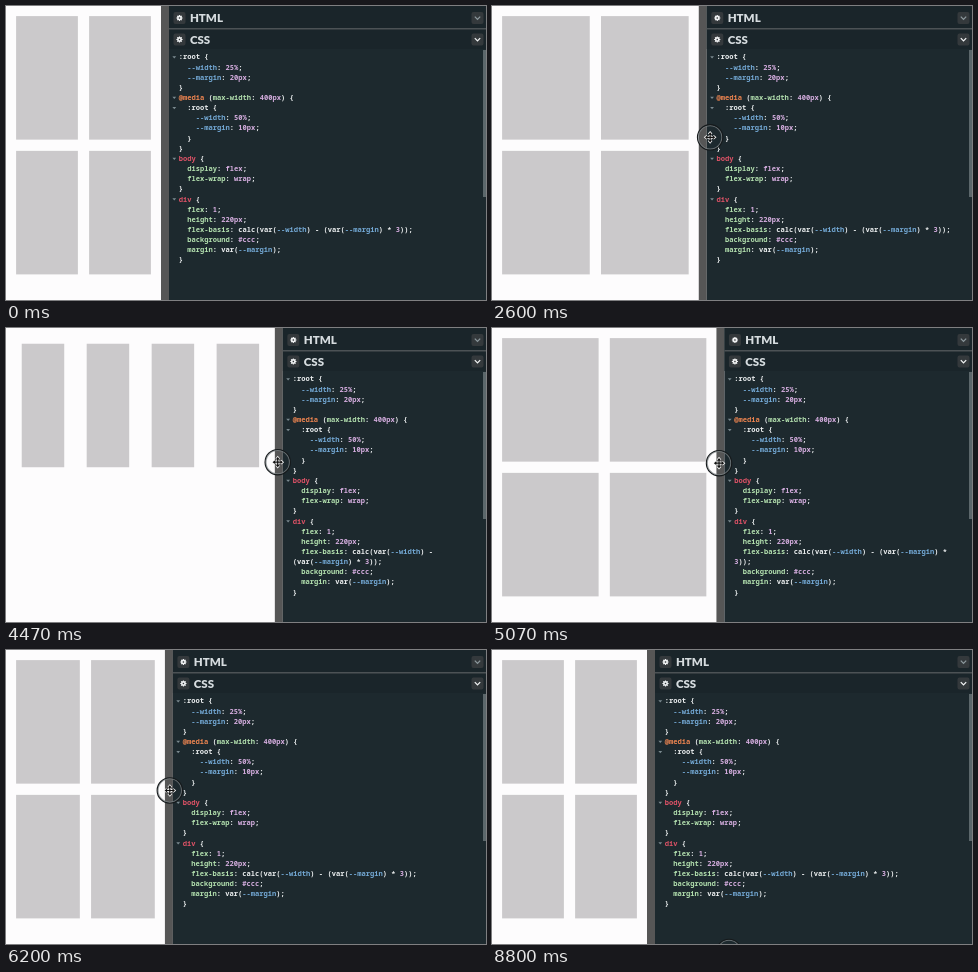
Recreate the animation shown at these times as an HTML page with a canvas. Size 480 px wide and 294 px high, loop 8870 ms.

```html
<!DOCTYPE html>
<html lang="en">
<head>
<meta charset="utf-8">
<title>Responsive flex columns</title>
<style>
html, body { margin: 0; width: 100%; height: 100%; overflow: hidden; background: #fdfcfd; }
canvas { display: block; }
</style>
</head>
<body>
<canvas id="stage" width="480" height="294"></canvas>
<script>
const ctx = document.getElementById('stage').getContext('2d');
const LOOP = 8870, SCALE = 0.5615, CHAR = 4.255, LINE = 10.15;

const code = `:root {
  --width: 25%;
  --margin: 20px;
}
@media (max-width: 400px) {
  :root {
    --width: 50%;
    --margin: 10px;
  }
}
body {
  display: flex;
  flex-wrap: wrap;
}
div {
  flex: 1;
  height: 220px;
  flex-basis: calc(var(--width) - (var(--margin) * 3));
  background: #ccc;
  margin: var(--margin);
}`.split('\n');

// One colour per group: plain text, at-rule, tag, variable, property, value
const token = /(:root|calc|var)|(@media)|(body|div)|(--\w+)|([\w-]+(?=:))|(#?\w[\w%]*)|(\s+|.)/g;
const colors = ['#eceff0', '#ec8450', '#dc5266', '#73a8d4', '#b2dfae', '#d6aee0', '#eceff0'];

function ease(t, start, duration, power = 1) {
  const u = Math.min(1, Math.max(0, (t - start) / duration)) ** power;
  return u * u * (3 - 2 * u);
}

const dragOut = t => ease(t, 1600, 2000, 1.37);
const dragBack = t => ease(t, 3440, 3050);
const previewWidth = t => 155 + 155 * (dragOut(t) - dragBack(t));

// The divider trails the pointer slightly while dragged
function pointerAt(t) {
  const away = 1 - ease(t, 70, 1530), leave = ease(t, 6950, 1120);
  return {
    x: previewWidth(t + 45) + 6 + 76 * (away + leave),
    y: 130 + 4 * dragOut(t) + 7 * dragBack(t) ** 3 + 180 * away + 161 * leave,
    onHandle: away + leave < 0.01
  };
}

function rect(x, y, w, h, color) {
  ctx.fillStyle = color;
  ctx.fillRect(x, y, w, h);
}

function stroke(color, width, path) {
  ctx.strokeStyle = color;
  ctx.lineWidth = width;
  path ? ctx.stroke(path) : ctx.stroke();
}

function ring(x, y, radius, color, width) {
  ctx.beginPath();
  ctx.arc(x, y, radius, 0, 7);
  stroke(color, width);
}

function drawPreview(w) {
  const cols = w <= 225.4 ? 2 : 4;
  const margin = (cols === 2 ? 10 : 20) * SCALE, edge = 8 * SCALE;
  const height = 220 * SCALE, cell = (w - 2 * edge) / cols;
  rect(0, 0, 480, 294, '#fdfcfd');
  for (let i = 0; i < 4; i++) {
    rect(edge + margin + i % cols * cell,
      edge + margin + Math.floor(i / cols) * (height + 2 * margin),
      cell - 2 * margin, height, '#cbc9cb');
  }
}

function drawGear(x, y) {
  ctx.beginPath();
  for (let i = 0; i < 8; i++) {
    const a = i * Math.PI / 4;
    ctx.moveTo(x, y);
    ctx.lineTo(x + 3.1 * Math.cos(a), y + 3.1 * Math.sin(a));
  }
  stroke('#f0f2f3', 1.1);
  ring(x, y, 1.7, '#f0f2f3', 1.5);
  rect(x - 0.7, y - 0.7, 1.4, 1.4, '#34393c');
}

function drawHeader(x, y, label, chevron) {
  ctx.fillStyle = '#34393c';
  ctx.beginPath();
  ctx.roundRect(x + 12.5, y - 6, 12, 12, 2);
  ctx.roundRect(465.5, y - 6, 12, 12, 2);
  ctx.fill();
  drawGear(x + 18.5, y);
  ctx.font = '900 11.5px Lato, sans-serif';
  ctx.fillStyle = '#d6dcdf';
  ctx.fillText(label, x + 28.9, y + 4.2);
  ctx.beginPath();
  ctx.moveTo(468.8, y - 1.4);
  ctx.lineTo(471.5, y + 1.4);
  ctx.lineTo(474.2, y - 1.4);
  stroke(chevron, 1.3);
}

function drawCode(x) {
  const max = Math.floor((471 - x) / CHAR);
  let row = 0;
  const put = text => {
    for (const m of text.matchAll(token)) {
      ctx.fillStyle = colors[m.slice(1).findIndex(Boolean)];
      ctx.fillText(m[0], x + m.index * CHAR, 53.4 + row * LINE);
    }
    row++;
  };
  ctx.font = `600 ${CHAR / 0.6}px "Noto Sans Mono", "DejaVu Sans Mono", monospace`;
  for (let line of code) {
    if (line.endsWith('{')) {
      const y = 50.2 + row * LINE;
      ctx.fillStyle = '#7b8a90';
      ctx.beginPath();
      ctx.moveTo(x - 6.4, y);
      ctx.lineTo(x - 2.6, y);
      ctx.lineTo(x - 4.5, y + 2.3);
      ctx.fill();
    }
    while (line.length > max) {
      const cut = line.lastIndexOf(' ', max);
      if (cut < 3) break;
      put(line.slice(0, cut));
      line = line.slice(cut + 1);
    }
    put(line);
  }
}

function drawEditor(w) {
  rect(w, 0, 8, 294, '#565656');
  rect(w + 8, 0, 480, 294, '#1d292e');
  rect(w + 8, 0, 480, 43, '#1a252a');
  rect(w + 8, 22, 480, 1.5, '#4c5255');
  drawHeader(w, 12, 'HTML', '#8b979c');
  drawHeader(w, 33.5, 'CSS', '#f0f2f3');
  drawCode(w + 17.8);
  rect(477, 44, 3, 147, '#5c676b');
}

function drawPointer({ x, y, onHandle }) {
  ring(x, y, 11.8, 'rgba(125,132,135,.75)', 1.3);
  ring(x, y, 12.7, '#15191b', 1.1);

  const shape = new Path2D();
  if (onHandle) {
    for (const [dx, dy] of [[1, 0], [0, 1], [-1, 0], [0, -1]]) {
      const at = (f, s) => [x + dx * f - dy * s, y + dy * f + dx * s];
      shape.moveTo(x, y);
      shape.lineTo(...at(4, 0));
      shape.moveTo(...at(2.8, -1.2));
      shape.lineTo(...at(4.2, 0));
      shape.lineTo(...at(2.8, 1.2));
    }
  } else {
    shape.moveTo(x, y - 4.5);
    shape.lineTo(x, y + 4.5);
  }
  stroke('#f4f4f4', 2.8, shape);
  stroke('#111', 1.2, shape);
}

function draw(now) {
  const t = now % LOOP, w = previewWidth(t);
  drawPreview(w);
  drawEditor(w);
  drawPointer(pointerAt(t));
  requestAnimationFrame(draw);
}
requestAnimationFrame(draw);
</script>
</body>
</html>
```
